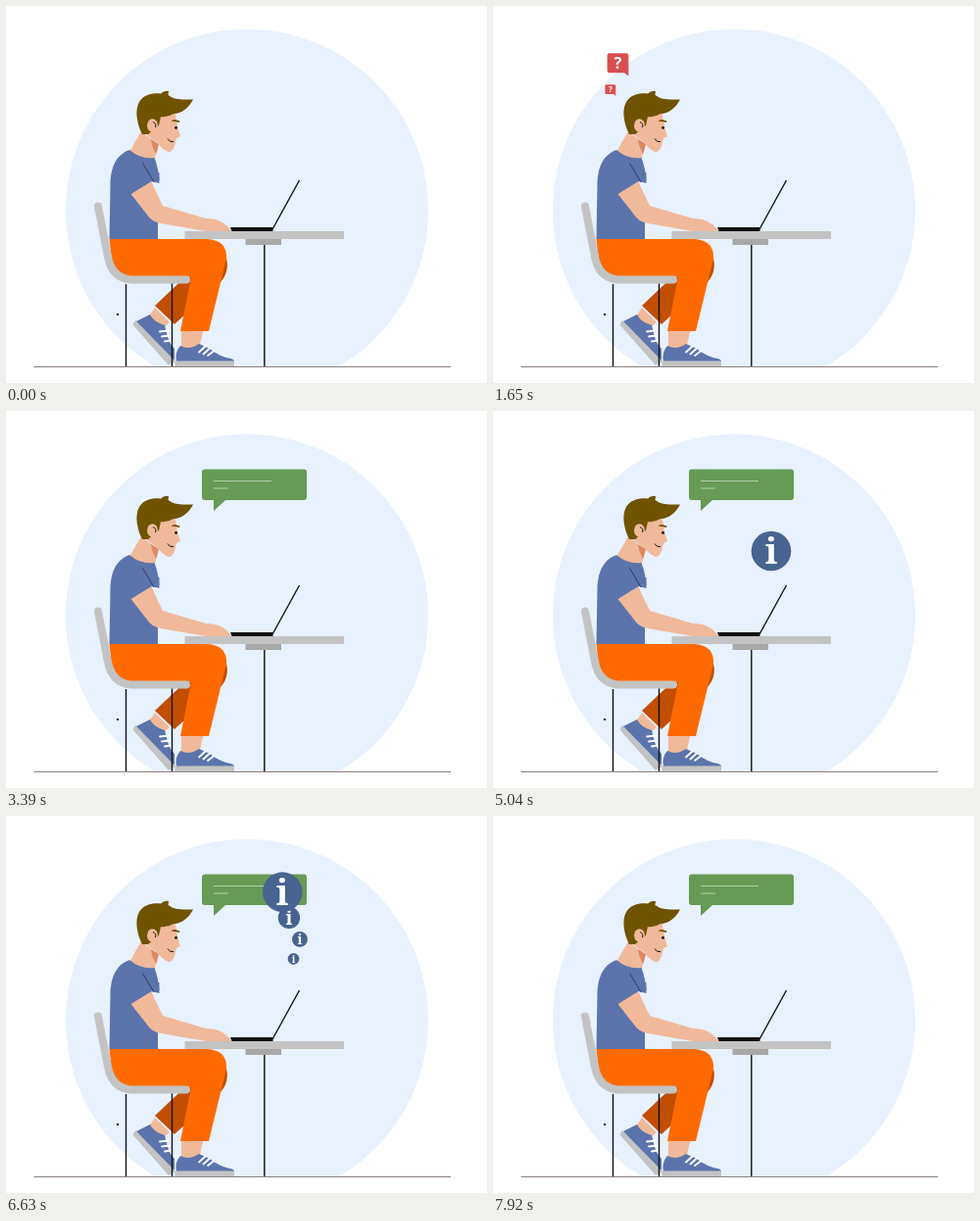
Write an HTML page that moves like this. It is 491 px wide and 385 px high and loops after 9090 ms.

```html
<!DOCTYPE html>
<html lang="en">
<head>
<meta charset="utf-8">
<title>Question and answer at the desk</title>
<style>
  html, body { margin: 0; width: 100%; height: 100%; overflow: hidden; background: #fff; }
  svg { display: block; width: 100%; height: 100%; }
  .skin { fill: #f0b99a; }
  .shirt { fill: #5b74ab; }
  .hair { fill: #705300; }
  .grey { fill: #c3c3c3; }
  .line { fill: none; stroke: #111; stroke-width: 1.4; }
  .lace { fill: none; stroke: #fff; stroke-width: 1.8; stroke-linecap: round; }
  text { fill: #fff; font-weight: 700; text-anchor: middle; }
  .ask { font-size: 19px; font-family: "Open Sans", "Noto Sans", sans-serif; }
  .info { font-size: 36px; font-family: "Noto Serif", "Liberation Serif", serif; }
</style>
</head>
<body>
<svg viewBox="0 0 491 385">
  <defs>
    <g id="question">
      <path fill="#d94f4f" d="M-10-13.5H10Q12.500-13.500 12.500-11V13.500L7.500 9.500H-10Q-12.500 9.500-12.500 7V-11Q-12.500-13.500-10-13.500Z"/>
      <text class="ask" y="5">?</text>
    </g>
    <g id="info">
      <circle r="20.300" fill="#476491"/>
      <text class="info" y="13">i</text>
    </g>
  </defs>

  <path fill="#e8f1fe" d="M152 368A185 185 0 1 1 340 368Z"/>

  <!-- back leg -->
  <path class="skin" d="M152 308L167 323L160 329L146 317Z"/>
  <path class="grey" d="M132 321L129.500 325.500L166 367L173 363Z"/>
  <path class="shirt" d="M133 322L147 315Q151 323 162 326L165 338Q167 345 172 350V362Z"/>
  <path class="lace" d="M157 332.500L166 331.500M159 337.500L167 336.500M162 342.500L169 341.500"/>
  <path fill="#c24e00" d="M222 250Q231 268 219 282L172 325L152 306L190 270Z"/>

  <!-- front foot and leg -->
  <path class="skin" d="M179 329H202L197 350H179Z"/>
  <g id="foot">
    <path class="shirt" d="M174 363Q172 354 178 347Q187 352 197 345L208 350Q218 358 229 360Q233 361 233 363Z"/>
    <path class="grey" d="M172.500 362.500H233V368H172.500Z"/>
    <path class="lace" d="M197 353.500L203.500 347.500M201.500 355.500L208 349.500M206 357L212.500 352"/>
  </g>
  <path fill="#ff6a00" d="M105.500 238H205Q226 239 225 258L207 332H178L189 277H130Q112 276 108 260Z"/>

  <!-- chair -->
  <path fill="none" stroke="#c3c3c3" stroke-width="8" stroke-linecap="round" d="M94 204.500L104 256Q108 278 128 279.500H184"/>
  <path class="line" d="M122.500 284V368M169.500 283.500V368"/>
  <rect x="113" y="314" width="2" height="2" fill="#111"/>

  <!-- table -->
  <path class="grey" d="M182.500 230H345V238H182.500Z"/>
  <path fill="#a8a8a8" d="M244.500 238H281V244H244.500Z"/>
  <path class="line" d="M263.800 244V368"/>

  <!-- head -->
  <path class="skin" d="M138 128L126 149Q140 160 152 156L155 141Z"/>
  <path fill="#df8860" d="M148 136L156 141L153.500 151Q149 145 148 136Z"/>
  <path class="skin" d="M145 114L172 106L175.500 125L178 133L174 135L172 143Q170 149 165.500 149Q158 145 155 140L144 132Z"/>
  <path class="hair" d="M139 131C134 121 131 107 136 98C141 90 150 88.500 158 89.500Q161 86 166 87L165.500 91C174 97 182 95 191 95.500C187 103 180 110 171 110Q165 114 158 113L156 122L145 131Z"/>
  <ellipse class="skin" cx="149.500" cy="122" rx="5.500" ry="6.800"/>
  <path class="line" style="stroke-width:1" d="M150 118.500Q154 120 152.500 124"/>
  <path class="hair" d="M168.500 117.500Q171 114.500 177.500 117.500L177 119Q172 117.500 168.500 117.500Z"/>
  <circle cx="173.500" cy="124.300" r="1.500" fill="#222"/>
  <path class="line" style="stroke-width:1" d="M165 135.500Q167 139.500 171 138.500"/>

  <!-- torso and arm -->
  <path class="shirt" d="M126 147C112 152 107 165 106.500 182L105.500 238H155V196L148 179L156.500 178Q155.500 165 151.500 155Q138 157 126 147Z"/>
  <path class="skin" d="M127.500 192L148 179L160 204L204 217Q222 217 230 230H204L158 222Q148 220 144 213Z"/>
  <path class="shirt" d="M130 170L127 192L148.500 179L156.500 181V170Z"/>
  <path class="line" style="stroke:#2c3d6b;stroke-width:1" d="M139.500 160.500L151 180"/>

  <!-- laptop -->
  <path fill="#111" d="M229 226H272.500V230H230.500Z"/>
  <path class="line" d="M272 228L299.500 178"/>
  <path fill="none" stroke="#8c8080" d="M28.500 368.500H454"/>

  <g id="answer">
    <path fill="#659b54" d="M203 59.500H304Q307 59.500 307 62.500V88Q307 91 304 91H224L212 102V91H203Q200 91 200 88V62.500Q200 59.500 203 59.500Z"/>
    <path stroke="#b0d0a6" d="M212 71.500H271M212 79H227"/>
  </g>
  <g id="floaters"></g>
</svg>

<script>
const LOOP = 9090;
const byId = id => document.getElementById(id);
const clamp = v => Math.max(0, Math.min(1, v));

// Damped spring from 0 to 1 with overshoot.
function spring(p, damping) {
  if (p <= 0) return 0;
  return p >= 1 ? 1 : 1 - Math.exp(-damping * p) * Math.cos(4 * Math.PI * p);
}

function addFloater(shape, props) {
  const node = document.createElementNS("http://www.w3.org/2000/svg", "use");
  node.setAttribute("href", "#" + shape);
  byId("floaters").append(node);
  return { node, ...props };
}

const questions = [
  { start: 30, sway: -25.5, rise: 43, size: 1 },
  { start: 810, sway: 5, rise: 34, size: 0.87 },
  { start: 1590, sway: -25, rise: 43, size: 1 }
].map(q => addFloater("question", q));

const infos = [
  { start: 6200, size: 0.29 },
  { start: 5880, size: 0.39 },
  { start: 5620, size: 0.55 }
].map(i => addFloater("info", { ...i, y: 158, sway: 16, rise: 53, life: 1500 }));
infos.push(addFloater("info", { start: 5040, size: 1, y: 143, sway: 6.5, rise: 29, life: 2050, popAt: 3390 }));

function place(node, x, y, scale, opacity = 1) {
  node.setAttribute("transform", `translate(${x} ${y}) scale(${scale})`);
  node.setAttribute("opacity", opacity);
}

function drawQuestion(q, time) {
  const age = (time - q.start) / 1000, life = 1.56;
  if (age <= 0 || age >= life) return place(q.node, 0, 0, 0, 0);
  const x = 122.5 + q.sway * Math.sin(Math.PI * age / 1.8);
  const y = 87.5 - q.rise * age ** 1.2;
  const grow = clamp(0.25 + age * 3);
  place(q.node, x, y, q.size * grow, clamp((life - age) / 0.15));
}

function drawInfo(i, time) {
  const age = Math.max(0, time - i.start);
  const lift = i.rise * (age / 1000) ** 1.75;
  const x = 284 + i.sway * Math.sin(Math.PI * lift / 60);
  const grow = i.popAt ? spring((time - i.popAt) / 510, 5.1) : clamp(age / 150);
  place(i.node, x, i.y - lift, i.size * grow, clamp((i.life - age) / 120));
}

function draw(time) {
  const tap = (time + 750) % 840 / 270;
  const angle = tap < 1 && time > 60 && time < 7950 ? -9 * Math.sin(Math.PI * tap) : 0;
  byId("foot").setAttribute("transform", `rotate(${angle} 174 367)`);

  const pop = spring((time - 2820) / 390, 7.4);
  byId("answer").setAttribute("transform", `translate(253.5 80) scale(${pop}) translate(-253.5 -80)`);

  questions.forEach(q => drawQuestion(q, time));
  infos.forEach(i => drawInfo(i, time));
}

const begin = performance.now();
function tick() {
  draw((performance.now() - begin) % LOOP);
  requestAnimationFrame(tick);
}
tick();
</script>
</body>
</html>
```
